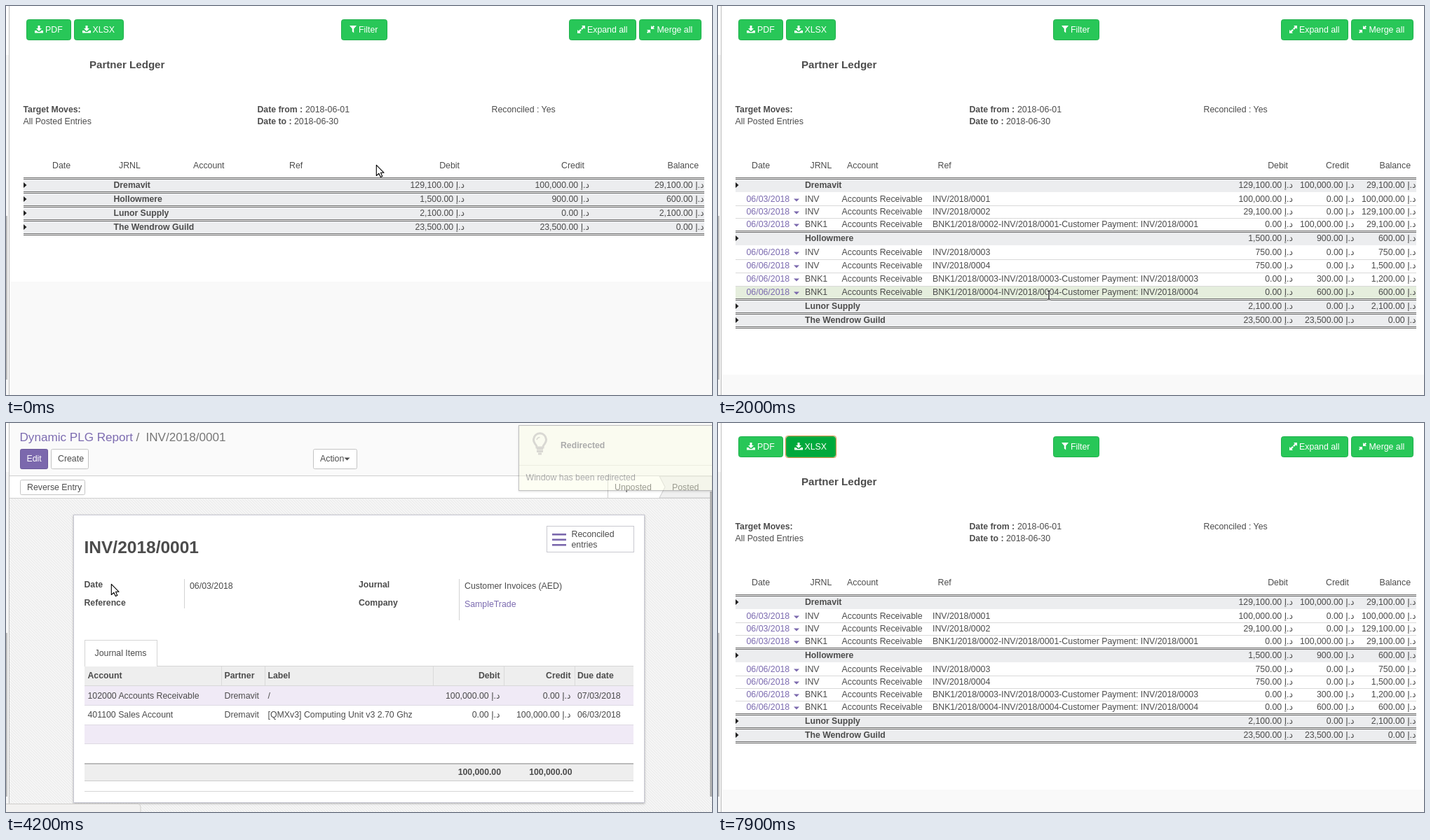
An HTML page for the animation above (8000 ms loop, 1007 by 556 pixels).

```html
<!DOCTYPE html>
<html lang="en">
<head>
<meta charset="utf-8">
<title>Partner Ledger</title>
<style>
  html, body { margin: 0; width: 100%; height: 100%; overflow: hidden; background: #fff; }
  svg { display: block; width: 1007px; height: 556px; }
  text { font: 12.34px "Liberation Sans", Arial, "DejaVu Sans", sans-serif; fill: #4c4c4c; white-space: pre; }
  .b { font-weight: bold; font-size: 12.25px; }
  .e { text-anchor: end; }
  .w { fill: #fff; }
  .link { fill: #7c6bb0; }
  .over { fill: #55468a; }
  .h1 { font-weight: bold; font-size: 15.1px; }
  .h2 { font-weight: bold; font-size: 24.5px; }
  .crumb { font-size: 17.1px; }
  .grey { fill: #777; }
</style>
</head>
<body>
<svg id="stage" viewBox="0 0 1007 556" xmlns="http://www.w3.org/2000/svg">
  <defs>
    <pattern id="weave" width="4" height="4" patternUnits="userSpaceOnUse">
      <rect width="4" height="4" fill="#f5f5f5"/>
      <path d="M0 0h1v1h-1zM1 1h1v1h-1zM2 2h1v1h-1zM3 3h1v1h-1z" fill="#e9e9e9"/>
    </pattern>
    <filter id="shadow" x="-10%" y="-20%" width="120%" height="150%">
      <feDropShadow dx="0" dy="1" stdDeviation="1.6" flood-color="#000" flood-opacity=".3"/>
    </filter>
  </defs>
  <g id="scene"></g>
</svg>
<script>
const LOOP = 8000, TICK = 100;
const GREEN = '#28c758', PURPLE = '#7b68ad';
const scene = document.getElementById('scene');

// Shape helpers
const rect = (x, y, w, h, fill, extra = '') =>
  `<rect x="${x}" y="${y}" width="${w}" height="${h}" fill="${fill}" ${extra}/>`;
const text = (x, y, s, cls = '') => `<text x="${x}" y="${y}" class="${cls}">${s}</text>`;
const path = (d, fill, x = 0, y = 0, extra = '') =>
  `<path d="${d}" fill="${fill}" transform="translate(${x} ${y})" ${extra}/>`;
const box = (x, y, w, h, fill, stroke, r = 0) =>
  rect(x + .5, y + .5, w - 1, h - 1, fill, `stroke="${stroke}" rx="${r}"`);
const aed = n => n + ' \u062f.\u0625';

const ICONS = {
  save: 'M4.5 0h3v4h2.5l-4 4-4-4h2.5zM0 7h2.5l2 2h3l2-2h2.5v3.5h-12z',
  filter: 'M0 0h10l-3.8 4.6v6l-2.4-2v-4z',
  expand: 'M6 0h5v5l-1.7-1.7-2.6 2.6-1.6-1.6 2.6-2.6zM5 11h-5v-5l1.7 1.7 2.6-2.6 1.6 1.6-2.6 2.6z',
  merge: 'M6 5V0l1.7 1.7 1.7-1.7 1.6 1.6-1.7 1.7 1.7 1.7zM5 6v5l-1.7-1.7L1.6 11 0 9.4l1.7-1.7L0 6z'
};

// Ledger data
const entry = (date, journal, ref, ...sums) => ({ date, journal, ref, sums });
const paid = (a, b) => `BNK1/2018/000${a}-INV/2018/000${b}-Customer Payment: INV/2018/000${b}`;
const GROUPS = [
  { name: 'Dremavit', sums: ['129,100.00', '100,000.00', '29,100.00'], rows: [
    entry('06/03/2018', 'INV', 'INV/2018/0001', '100,000.00', '0.00', '100,000.00'),
    entry('06/03/2018', 'INV', 'INV/2018/0002', '29,100.00', '0.00', '129,100.00'),
    entry('06/03/2018', 'BNK1', paid(2, 1), '0.00', '100,000.00', '29,100.00')] },
  { name: 'Hollowmere', sums: ['1,500.00', '900.00', '600.00'], rows: [
    entry('06/06/2018', 'INV', 'INV/2018/0003', '750.00', '0.00', '750.00'),
    entry('06/06/2018', 'INV', 'INV/2018/0004', '750.00', '0.00', '1,500.00'),
    entry('06/06/2018', 'BNK1', paid(3, 3), '0.00', '300.00', '1,200.00'),
    entry('06/06/2018', 'BNK1', paid(4, 4), '0.00', '600.00', '600.00')] },
  { name: 'Lunor Supply', sums: ['2,100.00', '0.00', '2,100.00'], rows: [] },
  { name: 'The Wendrow Guild', sums: ['23,500.00', '23,500.00', '0.00'], rows: [] }
];
const HEADS = ['Date', 'JRNL', 'Account', 'Ref', 'Debit', 'Credit', 'Balance'];
const NARROW = { heads: [66, 161, 267, 404, 647, 825, 988], name: 153.5, sums: [654, 832, 995.5] };
const WIDE = { heads: [48, 131.5, 184, 313.5, 813, 900, 988], name: 124, sums: [820, 907.5, 995.5] };

// Pointer: time, x, y, kind, glide from the previous key
const MOVES = [
  [0, 528, 227, 'arrow'], [300, 506, 253, 'arrow'], [600, 505, 262, 'arrow'],
  [900, 499, 312, 'beam', 1], [1000, 498, 324, 'arrow'], [1200, 492, 334, 'arrow', 1],
  [1400, 490, 337, 'arrow'], [1800, 478, 384, 'beam', 1], [2000, 472, 413, 'beam', 1],
  [2200, 462, 412, 'beam', 1], [2600, 112, 294, 'arrow', 1],
  [3400, 101, 275, 'hand'], [3700, 112, 302, 'hand', 1], [4000, 112, 321, 'arrow'],
  [4200, 150, 230, 'arrow'], [4400, 166, 180, 'arrow'], [4600, 168, 138, 'arrow', 1],
  [4800, 131, 69, 'arrow'], [5000, 127, 32, 'arrow'], [5200, 128, 24, 'hand'],
  [5300, 127, 20, 'hand'], [5700, 128, 24, 'arrow'], [5900, 130, 30, 'hand'],
  [6000, 150, 44, 'hand'], [6100, 163, 62, 'arrow'], [6200, 160, 65, 'arrow'],
  [6500, 147, 44, 'hand'], [6600, 148, 42, 'hand'], [6700, 150, 43, 'hand'],
  [6900, 151, 44, 'hand'], [7100, 153, 42, 'hand'], [7200, 152, 44, 'hand'],
  [7900, 0, 0, 'none']
];
const NOTICE = [[0, 0], [4000, .15], [4200, .45], [4400, .7], [4500, .88], [4600, 1],
  [6900, .75], [7100, .4], [7200, .1], [7900, 0]];

const within = (t, a, b) => t >= a && t < b;
const lastKey = (keys, t) => keys.findLastIndex(k => k[0] <= t);

function pointerAt(t) {
  const i = lastKey(MOVES, t), [t0, x, y, kind] = MOVES[i], next = MOVES[i + 1];
  if (!next || !next[4]) return { x, y, kind };
  const u = (t - t0) / (next[0] - t0);
  return { x: Math.round(x + (next[1] - x) * u), y: Math.round(y + (next[2] - y) * u), kind };
}

function pointer({ x, y, kind }) {
  const line = 'stroke="#000" stroke-width="1.1" stroke-linejoin="round"';
  if (kind === 'arrow')
    return path('M0 0V15.2L3.5 12 6 17.3 8.5 16.2 6.2 11H10.8Z', '#fff', x + .3, y + .3, line);
  if (kind === 'hand')
    return path('M-1.5 8.5V1.6Q-1.5.5-.3.5T1 1.6V5.2Q3.5 4.4 3.8 5.8 6 5.2 6.4 6.6 9.2 6.2 9.2 8.4V11.5L8 15.8H0L-1.8 12.6-4.4 9.6Q-4.6 7.6-2.8 7.8Z', '#fff', x, y, line)
      + path('M1 5v4M3.8 5.8v3.4M6.4 6.6v3', 'none', x, y, 'stroke="#000" stroke-width=".8"');
  if (kind === 'beam') {
    const d = 'M-2.5-6H-.8L0-5.2.8-6H2.5M0-5.2V5.4M-2.5 6H-.8L0 5.4.8 6H2.5';
    return path(d, 'none', x, y, 'stroke="#fff" stroke-width="3"')
      + path(d, 'none', x, y, 'stroke="#000" stroke-width="1.2"');
  }
  return '';
}

const button = (x, w, tx, label, icon, ix, fill = GREEN) =>
  box(x, 19, w, 30, fill, '#1fb04c', 3) + path(ICONS[icon], '#fff', ix, 28) + text(tx, 38, label, 'w');

const doubleLine = y => rect(25, y - 1, 971, 3, '#fff')
  + rect(25, y - 1, 971, 1, '#666') + rect(25, y + 1, 971, 1, '#666');

function ledger(t, p) {
  const cols = t < 600 ? NARROW : WIDE;
  const open = [t >= 600, t >= 1400];
  const heights = [t < 1400 ? 18.4 : 18, t < 5700 ? 18.85 : 18];
  const menuOpen = within(t, 3400, 4200);
  let out = '', y = 246;
  const sums = (list, base) =>
    list.map((s, i) => text(cols.sums[i], base, aed(s), 'e')).join('');

  HEADS.forEach((h, i) => out += text(cols.heads[i], 232, h, i > 3 ? 'e' : ''));
  GROUPS.forEach((g, gi) => {
    out += rect(25, y, 971, 20, '#ecedef') + doubleLine(y);
    out += path('M0 0L4.5 4 0 8Z', '#222', 25, y + 6);
    out += text(cols.name, y + 14, g.name, 'b') + sums(g.sums, y + 14);
    y += 20;
    if (open[gi]) {
      const top = y, last = g.rows.length - 1;
      const edge = i => top + Math.round(i * heights[gi]);
      g.rows.forEach((r, i) => {
        const a = edge(i), b = edge(i + 1), base = a + 14;
        const first = gi === 0 && i === 0;
        const hot = menuOpen ? first : t < 4000 && p.y >= a + 2 && p.y < b + (i === last ? 4 : 2);
        if (hot) out += rect(25, a + 2, 971, b - a - 1, '#e5eedd');
        if (i) out += rect(25, a + 1, 971, 1, '#d9d9d9');
        out += text(40.5, base, r.date, menuOpen && first ? 'over' : 'link')
          + path('M0 0H8L4 4Z', PURPLE, 108, base - 4.5)
          + text(124, base, r.journal) + text(176.5, base, 'Accounts Receivable')
          + text(306, base, r.ref) + sums(r.sums, base);
      });
      y = edge(last + 1) + 2;
    }
    out += doubleLine(y);
  });
  return { out, end: y };
}

function report(t, p) {
  const table = ledger(t, p), foot = table.end + 68;
  const dark = t >= 7900 || (t >= 5700 && p.kind === 'hand');
  let out = rect(5, foot, 1002, 556 - foot, '#f9f9f9');
  out += button(29, 64, 56, 'PDF', 'save', 41)
    + button(97, 71, 123.5, 'XLSX', 'save', 109, dark ? '#00a93c' : GREEN)
    + button(478, 66, 503, 'Filter', 'filter', 490)
    + button(803, 96, 829, 'Expand all', 'expand', 815)
    + button(903, 89, 928.5, 'Merge all', 'merge', 914);
  if (t >= 6700) out += box(96, 18, 73, 32, 'none', '#cf8f45', 3);
  out += text(119, 89, 'Partner Ledger', 'h1')
    + text(24.5, 152, 'Target Moves:', 'b') + text(24.5, 169, 'All Posted Entries')
    + text(358.5, 152, 'Date from :', 'b') + text(427, 152, '2018-06-01')
    + text(358.5, 169, 'Date to :', 'b') + text(411, 169, '2018-06-30')
    + text(692.5, 152, 'Reconciled : Yes');
  out += table.out;
  if (within(t, 3400, 4000)) {
    out += rect(41, 288, 151, 33, '#fff', 'rx="2" stroke="#d5d5d5" stroke-width=".6" filter="url(#shadow)"');
    if (p.y > 292) out += rect(41, 293, 151, 22, '#f2f2f2');
    out += text(60.5, 307, 'View Source move');
  }
  return out;
}

const plain = (x, y, w, h, tx, label) =>
  box(x, y, w, h, '#fff', '#c4c4c4', 2) + text(tx, Math.floor(y + h / 2 + 4), label);

function form(t) {
  let out = rect(5, 0, 1002, 75, '#fafafa') + rect(5, 75, 1002, 1, '#cfcfcf')
    + rect(5, 107, 1002, 1, '#cfcfcf') + rect(5, 108, 1002, 448, 'url(#weave)');
  out += text(19.5, 26, 'Dynamic PLG Report', t >= 5200 ? 'crumb over' : 'crumb link')
    + text(185.5, 26, '/', 'crumb grey') + text(199.5, 26, 'INV/2018/0001', 'crumb grey');
  out += box(20, 37, 40, 29, PURPLE, '#6a589b', 2) + text(29.5, 55, 'Edit', 'w')
    + plain(64, 37, 54, 29, 74, 'Create') + plain(438, 37, 63, 29, 448, 'Action')
    + path('M0 0H8L4 4Z', '#4c4c4c', 482.5, 49.5) + plain(20, 81, 93, 22, 30, 'Reverse Entry');
  // Status steps
  out += rect(858, 76, 1, 31, '#ccc') + text(868, 96, 'Unposted')
    + path('M0 0L8 15.5 0 31H75V0Z', '#f0f0f0', 932, 76, 'stroke="#ccc"') + text(950, 96, 'Posted');

  out += rect(96.5, 131.5, 814, 411, '#fff', 'stroke="#c8c8d3" filter="url(#shadow)"');
  out += text(111.5, 186, 'INV/2018/0001', 'h2') + box(771, 147, 125, 38, '#fff', '#c9c9d0');
  [158, 165.5, 173].forEach(y => out += rect(779, y, 20, 2.6, PURPLE));
  out += text(806.5, 163, 'Reconciled') + text(806.5, 178, 'entries');
  out += text(111.5, 235, 'Date', 'b') + text(111.5, 261, 'Reference', 'b')
    + text(503, 235, 'Journal', 'b') + text(503, 261, 'Company', 'b')
    + rect(254, 223, 1, 42, '#d3d3d3') + rect(646, 223, 1, 59, '#d3d3d3')
    + text(262, 237, '06/03/2018') + text(654, 237, 'Customer Invoices (AED)')
    + text(654, 263, 'SampleTrade', 'link');

  out += rect(112, 347, 783, 1, '#d5d5d5') + box(112, 310, 104, 40, '#fff', '#d5d5d5')
    + text(126.5, 333, 'Journal Items');
  out += rect(112, 348, 783, 28, '#eee') + rect(112, 375, 783, 1, '#d8d8d8');
  [307, 369, 609, 710, 811].forEach(x => out += rect(x, 348, 1, 27, '#dadada'));
  const line = (y, cells, cls) => cells.forEach((s, i) =>
    out += text([116.5, 311.5, 373.5, 704.5, 805.5, 815][i], y, s, cls + (i === 3 || i === 4 ? ' e' : '')));
  line(365, ['Account', 'Partner', 'Label', 'Debit', 'Credit', 'Due date'], 'b');
  out += rect(112, 376, 783, 28, '#f0eaf6') + rect(112, 431, 783, 28, '#f0eaf6');
  [403, 431, 458].forEach(y => out += rect(112, y, 783, 1, '#dedae3'));
  line(394, ['102000 Accounts Receivable', GROUPS[0].name, '/', aed('100,000.00'), aed('0.00'), '07/03/2018'], '');
  line(421, ['401100 Sales Account', GROUPS[0].name, '[QMXv3] Computing Unit v3 2.70 Ghz',
    aed('0.00'), aed('100,000.00'), '06/03/2018'], '');
  out += rect(112, 486, 783, 26, '#eee') + rect(112, 486, 783, 2, '#bbb')
    + rect(112, 511, 783, 1, '#ccc') + rect(112, 526, 783, 1, '#d5d5d5')
    + text(706, 503, '100,000.00', 'b e') + text(807.5, 503, '100,000.00', 'b e');
  return out + rect(1004, 98, 3, 436, '#b0b0b0');
}

function notice(alpha) {
  if (!alpha) return '';
  const pen = 'stroke="#b3b1a4" stroke-width="3"';
  return `<g opacity="${alpha}">`
    + rect(731.5, 3.5, 290, 93, '#fbfde5', 'stroke="#777" filter="url(#shadow)"')
    + rect(732, 60, 275, 1, '#dcdec4')
    + path('M6 20Q6 17 3.5 14.5A9 9 0 1 1 17.5 14.5Q15 17 15 20Z', 'none', 751, 15, pen)
    + path('M6 22H15M6 25.5H15M8 29H13', 'none', 751, 15, pen)
    + path('M6 9Q7 5.5 10.5 5.5', 'none', 751, 15, 'stroke="#b3b1a4" stroke-width="1.5"')
    + text(791, 36, 'Redirected', 'b') + text(741.5, 82, 'Window has been redirected') + '</g>';
}

function draw(t) {
  const p = pointerAt(t), isForm = within(t, 4200, 5700);
  let out = rect(0, 0, 1007, 556, '#fff') + (isForm ? form(t) : report(t, p));
  out += rect(0, 70, 4, 486, '#f5f5f5') + rect(0, 300, 2, 234, '#bcbcbc') + rect(4, 0, 1, 556, '#bdbdbd');
  if (within(t, 3400, 4400) || within(t, 6900, 7900))
    out += rect(-4.5, 544.5, 196.5, 20, '#f2f1f0', 'rx="4" stroke="#cfcdcb"');
  out += notice(NOTICE[lastKey(NOTICE, t)][1]);
  scene.innerHTML = out + pointer(p);
}

let shown = -1;
function frame(now) {
  const t = Math.floor(now % LOOP / TICK) * TICK;
  if (t !== shown) draw(shown = t);
  requestAnimationFrame(frame);
}
draw(0);
requestAnimationFrame(frame);
</script>
</body>
</html>
```
